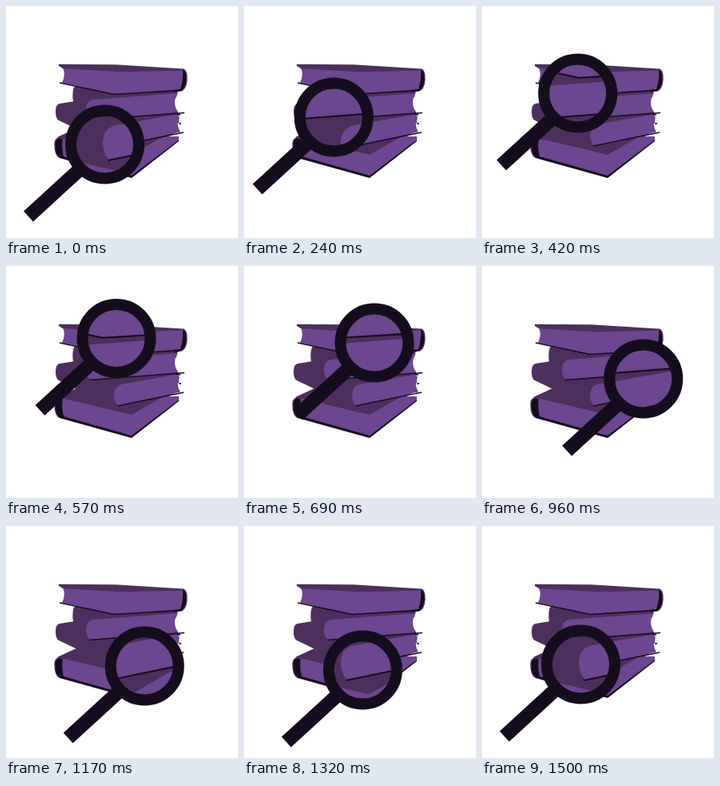
Recreate the animation shown at these times as an HTML page. Size 290 px wide and 290 px high, loop 2.46 s.

```html
<!DOCTYPE html>
<html lang="en">
<head>
<meta charset="utf-8">
<title>Searching the books</title>
<style>
  html, body { margin: 0; width: 100%; height: 100%; overflow: hidden; background: #fff; }
  svg { display: block; width: 100vw; height: 100vh; }
  .light { fill: #6c468f; }
  .dark { fill: #4d2f5e; }
  .ink { fill: #150d1d; }
  .line { fill: none; stroke: #150d1d; stroke-width: 1.3; stroke-linejoin: round; }
  .rim { stroke: #4d2f5e; }
</style>
</head>
<body>
<svg viewBox="0 0 290 290">
  <defs>
    <clipPath id="lens"><circle id="hole" r="38"/></clipPath>
    <g id="books">
      <!-- bottom book -->
      <path class="ink" d="M61 172Q61 166 66 164L90 157L216 166V169L157 215L67 190Q61 187 61 172Z"/>
      <path class="dark" d="M64 164L90 152L145 148L214 157L157 188L71 167Z"/>
      <path class="light" d="M71 165.500L157 186L197 163L216 163V167.500L157 212L72 188Q69 176 71 165.500Z"/>
      <path class="line rim" d="M70 165Q61 164 61 173Q61 187 67 189"/>
      <!-- third book -->
      <path class="dark" d="M67 122L86 119L215 132L216 146L140 160L89 154L66 143Q62 141 62 132Q62 123 67 122Z"/>
      <path class="dark" d="M102 136L214 130L215 140L140 173L89 154L106 144Z"/>
      <path class="light" d="M146 147.500L214 135.500Q219 138 215 145Q214 151 218 157.500L140 174.500Q135 170 135 160Q136 149 146 147.500Z"/>
      <path class="line" d="M139 175L222 158M213 135L218 136M216 147L219 147"/>
      <!-- second book -->
      <path class="dark" d="M86 100L135 108L215 103L213 114L110 142L101 143L84 120Q82 106 86 100Z"/>
      <path class="light" d="M109 117L215 109Q207 120 215 133L105 142Q100 138 100 130Q100 118 109 117Z"/>
      <path class="line" d="M104 142.500L223 133.500M211 108L217 106"/>
      <!-- top book -->
      <path class="ink" d="M214 79L222 79Q226 81 226 92Q225 105 218 106.500L210 106Z"/>
      <path class="line rim" d="M221 79Q226.500 80 226 92Q225 104 219 106"/>
      <path class="light" d="M71 77L142 82L221 79Q222 92 218 104L135 110L70 96Q75 86 71 77Z"/>
      <path class="dark" d="M66 72.800L137 73.300L222 78.500V80.500L142 82.500L71 78L66 75Z"/>
      <path class="line" d="M67 96L135 110.500L220 105.500"/>
    </g>
  </defs>
  <use href="#books"/>
  <g clip-path="url(#lens)">
    <use href="#books" transform="translate(-95 -87) scale(1.6)"/>
  </g>
  <g id="glass" fill="none" stroke="#150d1d">
    <circle r="42.500" stroke-width="14"/>
    <path d="M-30 30L-95.500 90" stroke-width="17.500"/>
  </g>
</svg>
<script>
  const LOOP = 2460, STEP = 30;
  // Lens centre along its path: time, x, y
  const path = [
    [0, 123.5, 173], [240, 112.3, 139], [420, 119.7, 109], [540, 132.3, 92.5],
    [600, 144.2, 89.5], [690, 163, 96], [960, 201.7, 141], [1080, 187.2, 161.5],
    [1170, 173.2, 175], [1290, 153, 180], [1500, 123.5, 173]
  ];
  const glass = document.getElementById('glass');
  const hole = document.getElementById('hole');

  const slope = (a, b, axis) => (b[axis] - a[axis]) / (b[0] - a[0]);

  function tangent(i, axis) {
    const prev = path[i - 1], here = path[i], next = path[i + 1];
    if (!prev) return slope(here, next, axis);
    if (!next) return slope(prev, here, axis);
    const before = here[0] - prev[0], after = next[0] - here[0];
    return (slope(prev, here, axis) * after + slope(here, next, axis) * before) / (before + after);
  }

  function position(time, axis) {
    const t = Math.min(time, 1500);
    let i = 0;
    while (i < path.length - 2 && t > path[i + 1][0]) i++;
    const a = path[i], b = path[i + 1], span = b[0] - a[0];
    const u = (t - a[0]) / span, v = 1 - u;
    return v * v * (1 + 2 * u) * a[axis] + u * u * (3 - 2 * u) * b[axis]
      + span * u * v * (v * tangent(i, axis) - u * tangent(i + 1, axis));
  }

  function draw(now) {
    const time = Math.floor((now % LOOP) / STEP) * STEP;
    const move = `translate(${position(time, 1)} ${position(time, 2)})`;
    glass.setAttribute('transform', move);
    hole.setAttribute('transform', move);
  }

  const start = performance.now();
  function tick() {
    draw(performance.now() - start);
    requestAnimationFrame(tick);
  }
  tick();
</script>
</body>
</html>
```
